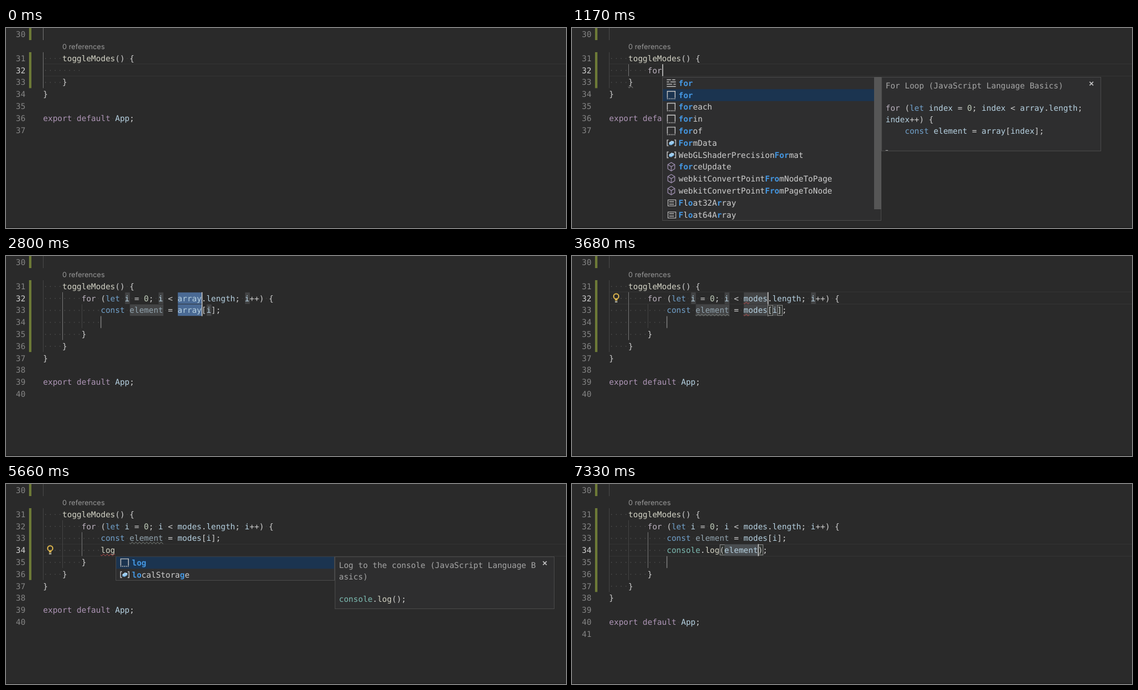
These frames come from a looping animation (925x331 px, 7410 ms). An HTML page with a canvas:

```html
<!DOCTYPE html>
<html lang="en">
<head>
<meta charset="utf-8">
<title>Editor snippets</title>
<style>
html, body { margin: 0; width: 100%; height: 100%; overflow: hidden; background: #2a2a2a; }
canvas { display: block; }
</style>
</head>
<body>
<canvas id="stage" width="925" height="331"></canvas>
<script>
const g = document.getElementById('stage').getContext('2d');
g.textRendering = 'geometricPrecision';   // unhinted, subpixel-placed glyphs
const LOOP = 7410, CW = 7.93, LH = 19.8, LEFT = 61.3;
const MONO = '13.17px "DejaVu Sans Mono", monospace';
const colX = c => LEFT + c * CW;
const rowY = r => 50 + r * LH;            // row 0 is line 31
const typed = (t, word, times) => word.slice(0, times.filter(s => t >= s).length);

const COLORS = {
  export: '#b097b8', default: '#b097b8', for: '#bcb2bf', let: '#72a2cc', const: '#72a2cc',
  console: '#7dbcb2', log: '#d4d4c4', toggleModes: '#d6d6c8'
};
const FOR_ITEMS = ['k*for*', 's*for*', 's*for*each', 's*for*in', 's*for*of', 'v*For*mData',
  'vWebGLShaderPrecision*For*mat', 'm*for*ceUpdate', 'mwebkitConvertPoint*Fro*mNodeToPage',
  'mwebkitConvertPoint*Fro*mPageToNode', 'e*F*l*o*at32A*r*ray', 'e*F*l*o*at64A*r*ray'];
const L_ITEMS = ['v*l*ength', 'k*l*et', 'v*l*ocalStorage', 'v*l*ocation', 'v*l*ocationbar',
  'a*l*ength', 's*l*og', 'v*L*isteningStateChangedEvent', 'v*L*ocation', 'vAudio*L*istener',
  'vAudioTrack*L*ist'];
const LOG_ITEMS = ['s*log*', 'v*lo*calStora*g*e'];

// Doc lines: [offset from top, text, is code]
const FOR_DOC = { w: 363, h: 123, lines: [[14, 'For Loop (JavaScript Language Basics)'],
  [51, 'for (let index = 0; index < array.length;', 1], [70.3, 'index++) {', 1],
  [89.5, '    const element = array[index];', 1]] };
const LOADING = { w: 111, h: 38, lines: [[14, 'Loading...']] };
const L_DOC = { w: 363, h: 38, lines: [[14, 'var length: number']] };
const LOG_DOC = { w: 363, h: 87, lines: [[14, 'Log to the console (JavaScript Language B'],
  [33.5, 'asics)'], [70.5, 'console.log();', 1]] };

function box(x, y, w, h, fill, line) {
  if (fill) { g.fillStyle = fill; g.fillRect(x, y, w, h); }
  if (line) {
    g.strokeStyle = line; g.lineWidth = 1;
    g.strokeRect(Math.round(x) + .5, Math.round(y) + .5, Math.round(w) - 1, Math.round(h) - 1);
  }
}

function text(s, x, cy, color, bold) {
  g.font = (bold ? 'bold ' : '') + MONO;
  g.fillStyle = color;
  [...s].forEach((ch, i) => g.fillText(ch, x + i * CW, cy + 4.8));
}

function code(s, x, cy, dots) {
  for (const { 0: tok, index } of s.matchAll(/[A-Za-z]+|\d+|./g)) {
    const tx = x + index * CW;
    if (tok === ' ') {
      if (dots) box(tx + 3.4, cy - .2, 1.3, 1.3, s.slice(0, index).trim() ? '#404040' : '#525252');
      continue;
    }
    const unused = tok === 'element' && /const $/.test(s.slice(0, index)) && dots;
    const plain = /\d/.test(tok) ? '#c2cebb' : /\w/.test(tok) ? '#b7d2e2' : '#cfcfcf';
    text(tok, tx, cy, unused ? '#93a5b0' : COLORS[tok] || plain);
  }
}

function path(points, color, width = 1) {
  g.beginPath();
  points.forEach(([x, y]) => g.lineTo(x, y));
  g.strokeStyle = color; g.lineWidth = width;
  g.stroke();
}

function wave(col, len, row, color) {
  const pts = [];
  for (let x = 0; x <= len * CW; x += .5)
    pts.push([colX(col) + x, rowY(row) + 8 + 1.3 * Math.sin(x * 1.05)]);
  path(pts, color);
}

const caret = (col, row) => box(Math.round(colX(col)), rowY(row) - 9.9, 1.5, LH, '#c4c4c4');
const tabEnd = row => box(156, rowY(row) - 9.9, 1.5, LH, '#777');

function mark(lines, row, word, color, withCaret) {
  for (const m of lines[row].matchAll(new RegExp('\\b' + word + '\\b', 'g'))) {
    const len = word.length;
    box(colX(m.index) + .5, rowY(row) - 9.5, len * CW, LH - .8, color);
    if (withCaret) caret(m.index + len, row);
  }
}

function bracket(col, row) {
  box(colX(col), rowY(row) - 9, CW + .6, LH - 1.5, '#303330', '#858585');
}

function bulb(row) {
  const y = rowY(row);
  g.beginPath(); g.arc(73, y - 3, 4.2, 0, 7);
  g.strokeStyle = '#d6b04c'; g.lineWidth = 2; g.stroke();
  box(71, y + 1, 4, 3, '#d6b04c');
  box(71, y + 5, 4, 2, '#b8b8a8');
}

function icon(kind, x, cy) {
  const grey = '#bcbcbc';
  if (kind === 'k') {
    [[0, 7], [0, 4], [0, 9], [0, 15]].forEach(([a, w], i) => box(x + a, cy - 6 + i * 3.7, w, 1.4, grey));
    box(x + 9, cy - 6, 5, 1.4, grey);
    box(x + 6, cy - 2.3, 9, 1.4, grey);
    box(x + 11, cy + 1.4, 4, 1.4, grey);
  } else if (kind === 's') {
    path([[x + 1, cy + 5], [x + 1, cy - 6], [x + 13.8, cy - 6], [x + 13.8, cy + 5]], grey, 1.4);
    for (let i = 0; i < 5; i++) box(x + .4 + i * 3, cy + 5.6, 1.6, 1.6, grey);
  } else if (kind === 'v') {
    path([[x + 3, cy - 4.5], [x + .8, cy - 4.5], [x + .8, cy + 5], [x + 3, cy + 5]], grey, 1.4);
    path([[x + 12.5, cy - 4.5], [x + 14.7, cy - 4.5], [x + 14.7, cy + 5], [x + 12.5, cy + 5]], grey, 1.4);
    g.beginPath();
    [[3.8, 0], [8, -3.2], [12, -2], [12, 1], [7.5, 4], [3.8, 3]].forEach(([a, b]) => g.lineTo(x + a, cy + b));
    g.fillStyle = '#7fbdec'; g.fill();
    path([[x + 4.2, cy], [x + 8, cy - 2.6], [x + 11.6, cy - 1.6], [x + 7.5, cy + 1], [x + 4.2, cy]], '#cfe6f6');
  } else if (kind === 'm') {
    const hex = [...Array(7)].map((_, i) =>
      [x + 7.5 + 6.6 * Math.sin(i * Math.PI / 3), cy - 7 * Math.cos(i * Math.PI / 3)]);
    path(hex, '#9b8dac', 1.2);
    path([hex[5], [x + 7.5, cy], hex[1]], '#9b8dac', 1.2);
    path([[x + 7.5, cy], hex[3]], '#9b8dac', 1.2);
  } else {
    box(x + 1, cy - 5, 14, 11, null, grey);
    if (kind === 'e') [-2, 2].forEach(d => box(x + 4, cy + d, 8, 1.3, grey));
    else {
      g.font = '7px "DejaVu Sans", sans-serif'; g.fillStyle = grey;
      g.fillText('abc', x + 1.8, cy + 3);
    }
  }
}

function popup(col, row, items, pick, doc, bar) {
  const x = Math.round(colX(col) + .5), y = Math.round(rowY(row) + 11), w = 362;
  const h = (bar ? 12 : items.length) * LH;
  box(x, y, w, h, '#2e2e2f', '#484848');
  box(x + 1, y + pick * LH + .4, w - 2, LH, '#1b3450');
  items.forEach((item, i) => {
    const cy = y + 9.9 + i * LH;
    icon(item[0], x + 7.5, cy);
    let tx = x + 27;
    item.slice(1).split('*').forEach((part, j) => {
      text(part, tx, cy, j % 2 ? '#4498e4' : '#cfcfcf', j % 2);
      tx += part.length * CW;
    });
  });
  if (bar) box(x + w - 12, y, 12, bar, '#565656');
  if (!doc) return;
  const dx = x + w;
  box(dx, y, doc.w, doc.h, '#2e2e2f', '#484848');
  for (const [dy, s, isCode] of doc.lines) {
    if (isCode) code(s, dx + 7, y + dy);
    else text(s, dx + 7, y + dy, '#a6a6a6');
  }
  if (doc === FOR_DOC) box(dx + 7, y + doc.h - 2, 4, 1, '#999');
  const cx = dx + doc.w - 16, cy = y + 11;
  path([[cx - 3, cy - 3], [cx + 3, cy + 3]], '#c4c4c4', 1.6);
  path([[cx - 3, cy + 3], [cx + 3, cy - 3]], '#c4c4c4', 1.6);
}

function draw(t) {
  const expanded = t >= 1790, logged = t >= 5970;
  const word = typed(t, 'for', [160, 400, 560]);
  const logWord = typed(t, 'log', [4800, 4880, 5260]);
  const arg = typed(t, 'element', [6380, 6620, 6700, 6850, 6930, 7090, 7250]);
  const v = t < 2300 ? 'index' : 'i';
  const list = t < 2960 ? 'array' : typed(t, 'modes', [2960, 3040, 3120, 3200, 3280]);
  const pad = ' '.repeat(8), deep = ' '.repeat(12);
  const body = !expanded ? [pad + word] : [
    `${pad}for (let ${v} = 0; ${v} < ${list}.length; ${v}++) {`,
    `${deep}const element = ${list}[${v}];`,
    ...(logged ? [`${deep}console.log(${arg});`, deep] : [deep + logWord]),
    pad + '}'
  ];
  const lines = ['    toggleModes() {', ...body, '    }', '}', '', 'export default App;', ''];
  const close = body.length + 1;
  const row = t < 3800 ? 1 : t < 4320 ? 2 : 3;
  const selecting = (expanded && t < 2300) || (t >= 2800 && t < 2960) || (t >= 3800 && t < 4320);

  box(0, 0, 925, 331, '#2a2a2a');
  if (!selecting) {
    const top = Math.round(rowY(row) - 10.5);
    box(61, top, 864, 1, '#333');
    box(61, top + 20, 864, 1, '#333');
  }

  // Changed-line bar and indent guides
  const end = rowY(close) + 9.9;
  box(38, 0, 4, 20, '#6c7937');
  box(38, 40, 4, end - 40, '#6c7937');
  const guide = (x, from, to, on) =>
    box(x, rowY(from) - 9.9, 1, (to - from + 1) * LH, on ? '#707070' : '#424242');
  box(61, 0, 1, 20, word ? '#484848' : '#707070');
  guide(61, 0, close, !word);
  if (word) guide(93, 1, body.length, row === 1);
  if (expanded) guide(125, 2, body.length - 1, row > 1);

  // Snippet fields and matching brackets
  const field = '#434445', active = '#4a6a94';
  if (expanded && t < 4320) {
    const onVar = t < 2800, onList = !onVar && t < 3800;
    for (const r of [1, 2]) {
      mark(lines, r, v, t < 2300 ? active : field, onVar);
      mark(lines, r, list, t >= 2800 && t < 2960 ? active : field, onList);
    }
    mark(lines, 2, 'element', onVar || onList ? field : active, !onVar && !onList);
    if (t >= 2300 && (onVar || t >= 2960) && t < 3800) {
      bracket(lines[2].indexOf('['), 2);
      bracket(lines[2].indexOf(']'), 2);
    }
    tabEnd(3);
  }
  if (logged) {
    bracket(23, 3);
    bracket(24 + arg.length, 3);
    if (arg) mark(lines, 3, arg, '#494d50');
    tabEnd(4);
  }

  // Text
  text('30', 16.3, 10, '#858585');
  g.font = '11.7px Inter, sans-serif'; g.fillStyle = '#999';
  g.fillText('0 references', 93, 35.3);
  lines.forEach((s, i) => {
    text(String(31 + i), 16.3, rowY(i), i === row ? '#d0d0d0' : '#858585');
    code(s, LEFT, rowY(i), true);
  });

  // Squiggles
  if (word && t < 2300) wave(4, 1, close, '#999');
  if (t >= 3360 && t < 3800) [1, 2].forEach(r => wave(28, 1.2, r, '#c94f4f'));
  if (t >= 3400 && t < 6300) wave(18, 7, 2, '#858b85');
  if (t >= 5580 && !logged) wave(12, 3, 3, '#c94f4f');

  // Carets
  if (word && !expanded) caret(8 + word.length, 1);
  if (t >= 4320 && t < 5580) caret(12 + logWord.length, 3);
  if (logged) caret(24 + arg.length, 3);
  if ((t >= 3400 && t < 3800) || (t >= 5580 && !logged)) bulb(row);

  // Suggestions
  if (t >= 240 && !expanded) {
    const doc = t >= 940 ? FOR_DOC : t >= 640 ? LOADING : null;
    popup(8 + word.length, 1, FOR_ITEMS, t >= 940 ? 1 : 0, doc, 219);
  }
  if (logWord && !logged) {
    if (logWord === 'log') popup(15, 3, LOG_ITEMS, 0, LOG_DOC);
    else popup(12 + logWord.length, 3, L_ITEMS, 0, L_DOC, 45);
  }
  box(0, 329.5, 925, 1.5, '#1f1f1f');
}

const start = performance.now();
function frame() {
  draw((performance.now() - start) % LOOP);
  requestAnimationFrame(frame);
}
frame();
</script>
</body>
</html>
```
